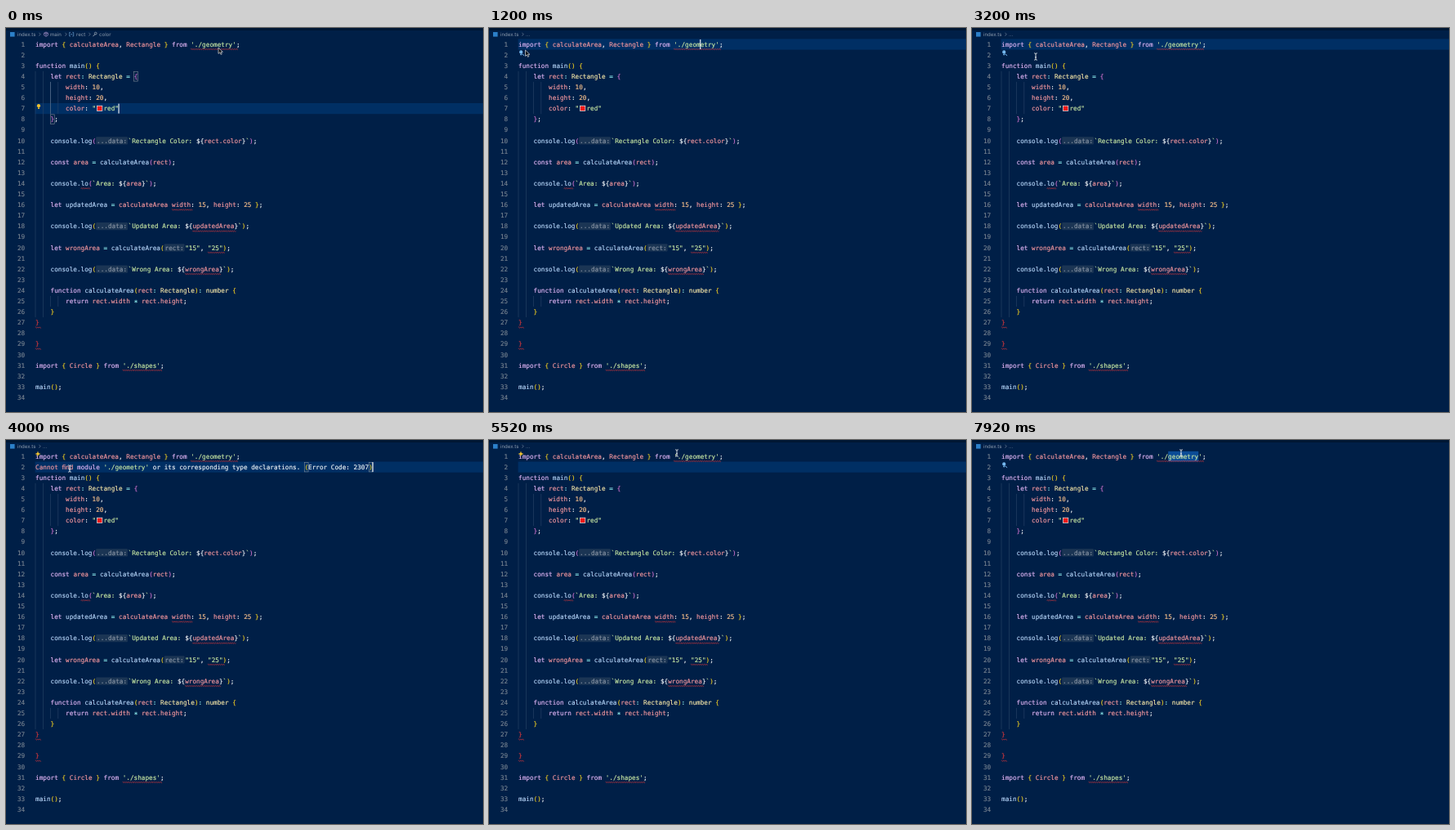
An HTML page for the animation above (8000 ms loop, 584x470 px).

```html
<!DOCTYPE html>
<html lang="en">
<head>
<meta charset="utf-8">
<title>Editor quick fix</title>
<style>
  html, body { margin: 0; width: 100%; height: 100%; overflow: hidden; background: #001f47; }
  svg { display: block; width: 584px; height: 470px; }
  text { white-space: pre; text-rendering: geometricPrecision; }
  .code { font: 7.708px "DejaVu Sans Mono", "Liberation Mono", monospace; stroke-width: 0.15; }
  .ui { font: 6.1px Inter, Roboto, sans-serif; }
</style>
</head>
<body>
<svg id="stage" viewBox="0 0 584 470"></svg>
<script>
const LOOP = 8000, X0 = 36, W = 4.64, ROW = 13.1;
const NS = 'http://www.w3.org/2000/svg';
const stage = document.getElementById('stage');

const colors = {
  k: '#e3b6f6', v: '#f7989f', w: '#f2f5f8', f: '#b5d4f8', t: '#f8e7a9', s: '#cbeaa5',
  n: '#f8c08c', p: '#94f5f5', g: '#f0cf22', o: '#d273cf', r: '#d8373c', h: '#8793a3'
};

// One string per line; the first letter of a segment is its colour, "~" adds an error line.
const lines = {
  1: "kimport |g{ |vcalculateArea|w, |vRectangle |g} |kfrom |~s'./geometry'|w;",
  3: "kfunction |fmain|g() {",
  4: "    |klet |vrect|p: |tRectangle |p= |o{",
  5: "        |vwidth|w: |n10|w,",
  6: "        |vheight|w: |n20|w,",
  7: '        |vcolor|w: |s"|c|sred"',
  8: "    |o}|w;",
  10: "    |fconsole.log|o(|h...data:|s`Rectangle Color: |w${|vrect.color|w}|s`|o)|w;",
  12: "    |kconst |varea |p= |fcalculateArea|o(|vrect|o)|w;",
  14: "    |fconsole.|~flo|o(|s`Area: |w${|varea|w}|s`|o)|w;",
  16: "    |klet |fupdatedArea |p= |vcalculateArea |~vwidth|w: |n15|w, |vheight|w: |n25 |g}|w;",
  18: "    |fconsole.log|g(|h...data:|s`Updated Area: |w${|~vupdatedArea|w}|s`|g)|w;",
  20: '    |klet |vwrongArea |p= |fcalculateArea|g(|hrect:|s"15"|w, |~s"25"|g)|w;',
  22: "    |fconsole.log|g(|h...data:|s`Wrong Area: |w${|~vwrongArea|w}|s`|g)|w;",
  24: "    |kfunction |fcalculateArea|g(|vrect|p: |tRectangle|g)|p: |tnumber |g{",
  25: "        |kreturn |vrect.width |p∗ |vrect.height|w;",
  26: "    |g}",
  27: "~r}",
  29: "~r}",
  31: "kimport |g{ |vCircle |g} |kfrom |~s'./shapes'|w;",
  33: "fmain|g()|w;"
};
// "ﬁ" is a ligature that fills one cell.
const pasted = "vCannot ﬁnd |kmodule |s'./geometry' |wor its corresponding type declarations. |g(|wError Code: 2307|g)";

const mid = n => 20 + ROW * (n - 1);
const col = c => X0 + c * W;

function add(parent, tag, attrs, text) {
  const el = document.createElementNS(NS, tag);
  for (const key in attrs) el.setAttribute(key, attrs[key]);
  if (text) el.textContent = text;
  parent.appendChild(el);
  return el;
}
const group = (parent = stage) => add(parent, 'g', {});
const box = (parent, x, y, width, height, fill, more) =>
  add(parent, 'rect', { x, y, width, height, fill, ...more });
const path = (parent, d, stroke, width = 0.8, fill = 'none') =>
  add(parent, 'path', { d, stroke, 'stroke-width': width, fill });
const label = (parent, x, y, text, fill) =>
  add(parent, 'text', { x, y, class: 'ui', fill }, text);
const mono = (parent, x, y, text, color, more) =>
  add(parent, 'text', { x, y, class: 'code', fill: color, stroke: color, ...more }, text);

function wave(parent, x, y, width) {
  let d = `M${x} ${y}`;
  for (let i = 0; i < width / 2.3; i++) d += 'q.575 -1.1 1.15 0t1.15 0';
  path(parent, d, '#d9363b', 0.8);
}

function drawLine(parent, n, source) {
  let x = X0;
  const y = mid(n) + 2.6;
  for (let part of source.split('|')) {
    if (!part.trim()) { x += part.length * W; continue; }
    const bad = part[0] === '~';
    if (bad) part = part.slice(1);
    const kind = part[0], text = part.slice(1);
    if (kind === 'c') {
      box(parent, x + 1.4, mid(n) - 3.4, 6.2, 6.2, '#f01818', { stroke: '#e8e8e8', 'stroke-width': 0.7 });
      x += 9.2;
      continue;
    }
    const hint = kind === 'h', width = text.length * W;
    if (hint) box(parent, x, mid(n) - 4.6, width + 1.6, 9.2, '#1b3554', { rx: 1 });
    mono(parent, hint ? x + 0.8 : x, y, text, colors[kind]);
    if (bad) wave(parent, x, mid(n) + 6, width);
    x += hint ? width + 2.2 : width;
  }
}

function bulb(parent, x, y, fill) {
  const g = add(parent, 'g', { transform: `translate(${x} ${y})` });
  add(g, 'circle', { cx: 0, cy: -0.8, r: 2.1, fill });
  box(g, -1, 1.4, 2, 1.6, fill);
}

function sparkle(parent, x, y, fill, size = 1) {
  const g = add(parent, 'g', { transform: `translate(${x} ${y}) scale(${size})` });
  path(g, 'M0 -3.2L.8 -.8L3.2 0L.8 .8L0 3.2L-.8 .8L-3.2 0L-.8 -.8Z', 'none', 0, fill);
}

// Timed parts: each is visible inside its spans.
const timed = [];
function during(spans, draw) {
  const g = group();
  draw(g);
  timed.push({ g, spans });
}

const band = n => g => box(g, 35.6, mid(n) - 6.6, 549, 13.2, '#002f64');
const caret = (n, x) => g => box(g, x - 0.5, mid(n) - 6, 1.1, 12, '#ffffff');
const match = (n, c) => g => box(g, col(c), mid(n) - 5.8, W, 11.6, 'none', { stroke: '#7f8a97', 'stroke-width': 0.6 });

const CLICK = 400, MENU = 1480, PICK = 2480, LINE2 = 3400, PASTE = 3760, UNDO = 4720, LINE1 = 6120, SELECT = 6300;

box(stage, 0, 0, 584, 3, '#001733');

during([[0, CLICK]], band(7));
during([[CLICK, LINE2], [LINE1, SELECT]], band(1));
during([[LINE2, LINE1]], band(2));
during([[SELECT, LOOP]], g => box(g, col(44), mid(1) - 6.2, 8 * W, 12.6, '#0b4c96'));

// Indent guides
const guides = group();
function guide(c, from, to) {
  box(guides, col(c) - 0.3, mid(from) - 6.5, 0.6, ROW * (to - from + 1), '#2a4568');
}
for (const c of [0, 2]) guide(c, 4, 26);
for (const c of [4, 6]) { guide(c, 5, 7); guide(c, 25, 25); }
during([[0, CLICK]], g => box(g, col(4) - 0.3, mid(5) - 6.5, 0.7, ROW * 3, '#5b7290'));

// Gutter and code
const code = group();
for (let n = 1; n <= 34; n++) {
  mono(code, 23.2, mid(n) + 2.6, String(n), '#75818f', { 'text-anchor': 'end' });
  if (lines[n]) drawLine(code, n, lines[n]);
}
during([[PASTE, UNDO]], g => {
  drawLine(g, 2, pasted);
  match(2, 71)(g);
  match(2, 88)(g);
});
during([[0, CLICK]], g => { match(4, 26)(g); match(8, 4)(g); });

// Breadcrumb
const GREY = '#8d9bad';
const crumbs = group();
const chevron = (g, x) => path(g, `M${x} 5.8l1.7 1.9l-1.7 1.9`, GREY, 0.6);
box(crumbs, 5, 5, 5.6, 5.6, '#2c80c9');
label(crumbs, 14, 9.9, 'index.ts', GREY);
chevron(crumbs, 40.5);
during([[0, CLICK]], g => {
  path(g, 'M49 5l2.4 1.2v2.8l-2.4 1.3l-2.4 -1.3v-2.8zl0 5.2M46.6 6.2l2.4 1.2l2.4 -1.2', '#b79ad6', 0.6);
  label(g, 54, 9.9, 'main', GREY);
  chevron(g, 72.5);
  path(g, 'M79 5.4h-1.3v4.6h1.3M81.4 5.4h1.3v4.6h-1.3M79 7.7h2.4', '#7eb4e6', 0.6);
  label(g, 86, 9.9, 'rect', GREY);
  chevron(g, 101.5);
  path(g, 'M106.5 10.2l2.5 -2.6', '#aeb8c4', 0.9);
  add(g, 'circle', { cx: 109.7, cy: 6.6, r: 1.4, fill: 'none', stroke: '#aeb8c4', 'stroke-width': 0.7 });
  label(g, 114, 9.9, 'color', GREY);
});
during([[CLICK, LOOP]], g => label(g, 45, 9.9, '...', GREY));

// Quick-fix markers
during([[0, CLICK]], g => bulb(g, 40, 96, '#f0c030'));
during([[880, LINE2], [SELECT + 240, LOOP]], g => {
  bulb(g, 39.2, 30.2, '#75b8ee');
  path(g, 'M40.5 31.5l2.6 2.4', '#75b8ee', 1);
});
during([[LINE2 + 80, LINE1]], g => sparkle(g, 39, 17, '#f2c530', 1.1));

during([[0, CLICK]], caret(7, 138));
during([[CLICK, MENU]], caret(1, col(48)));
during([[LINE2, PASTE], [UNDO, 5240]], caret(2, X0));
during([[PASTE, UNDO]], caret(2, col(89)));

// Popup menu
during([[MENU, PICK]], g => {
  box(g, 40.3, 40.3, 82.4, 48.6, '#08182d', { rx: 1.5, stroke: '#25405f', 'stroke-width': 0.6 });
  label(g, 45.5, 49, 'Quick Fix', '#8795a6');
  bulb(g, 49.3, 58.8, '#f0bf30');
  label(g, 56, 61.2, 'Copy Error Message', '#dde4ec');
  [['Fix', 70.6], ['Explain', 82.3]].forEach(([verb, y]) => {
    sparkle(g, 50, y + 0.5, '#c3ccd7', 0.8);
    sparkle(g, 47.4, y - 1.6, '#c3ccd7', 0.45);
    label(g, 56, y + 2.2, verb + ' using Wingaid', '#dde4ec');
  });
});

// Pointer
const pointer = group();
const arrow = path(pointer, 'M0 0V7.4L1.8 5.8L3 8.4L4.3 7.8L3.1 5.3H5.4Z', '#ffffff', 0.6, '#101418');
const beam = path(pointer, 'M-1.8 -4.2Q0 -4.2 0 -3.2Q0 -4.2 1.8 -4.2M0 -3.2V3.2M-1.8 4.2Q0 4.2 0 3.2Q0 4.2 1.8 4.2M-1 .9H1', '#f2f2f2', 0.9);

// time, x, y
const track = [
  [0, 260, 24], [320, 258, 20], [500, 258, 20], [1120, 44.5, 27], [1520, 44.5, 27],
  [1880, 61, 47], [2040, 61, 47], [2320, 74, 57], [2560, 74, 57], [2960, 78, 35],
  [4960, 78, 35], [5440, 230, 16], [5640, 230, 16], [6040, 256, 16], [LOOP, 256, 16]
];

function pointerAt(t) {
  const i = track.findIndex(k => k[0] > t);
  const [t0, x0, y0] = track[i - 1], [t1, x1, y1] = track[i];
  const u = (t - t0) / (t1 - t0), e = u * u * (3 - 2 * u);
  return [x0 + (x1 - x0) * e, y0 + (y1 - y0) * e];
}

function render(t) {
  for (const { g, spans } of timed) {
    const on = spans.some(([from, to]) => t >= from && t < to);
    g.setAttribute('visibility', on ? 'visible' : 'hidden');
  }
  const [x, y] = pointerAt(t);
  pointer.setAttribute('transform', `translate(${x} ${y})`);
  const text = t > 2700;
  arrow.setAttribute('visibility', text ? 'hidden' : 'visible');
  beam.setAttribute('visibility', text ? 'visible' : 'hidden');
}

function tick() {
  render(performance.now() % LOOP);
  requestAnimationFrame(tick);
}
tick();
</script>
</body>
</html>
```
